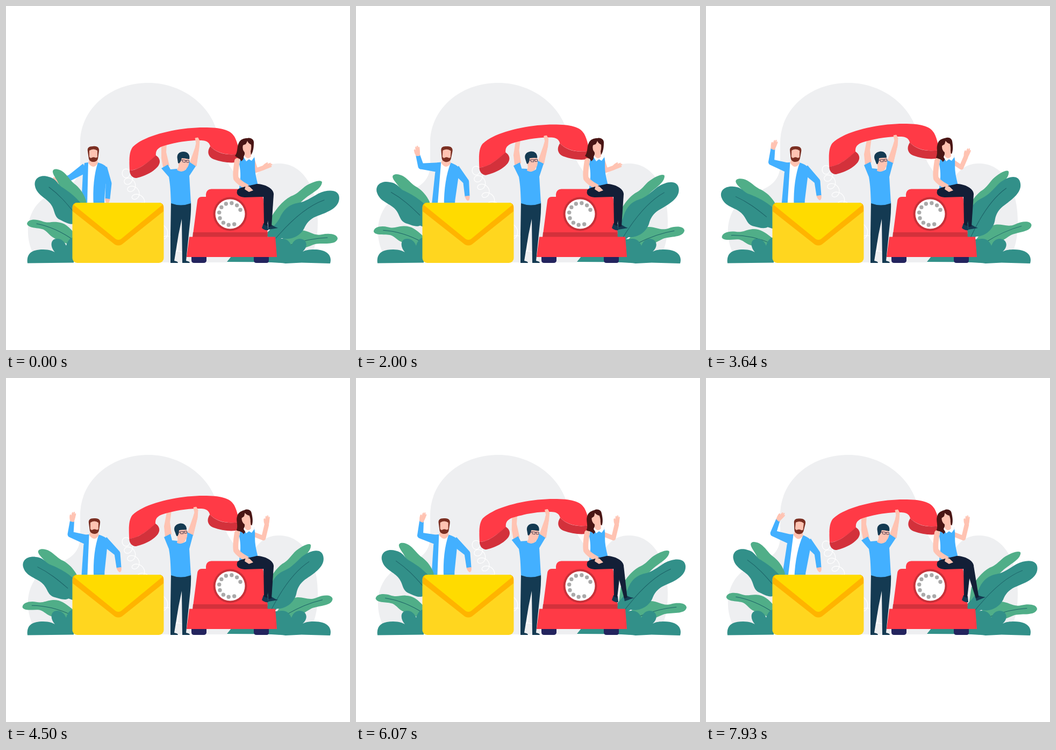
Animation, 640 px wide and 640 px high, one loop 8000 ms. Source, as an HTML page:

```html
<!DOCTYPE html>
<html lang="en">
<head>
<meta charset="utf-8">
<title>Contact us</title>
<style>
  html, body { margin: 0; width: 100%; height: 100%; overflow: hidden; background: #fff; }
  svg { display: block; width: 100vw; height: 100vh; }
  .blue { fill: #43b0ff; } .skin { fill: #ffc3b2; } .red { fill: #ff3a46; } .dark { fill: #d3313b; }
  .fir { fill: #329089; } .mint { fill: #50ae88; } .denim { fill: #143a52; } .navy { fill: #131f37; }
  .hair { fill: #4a1615; } .beard { fill: #7b2f22; } .white { fill: #fff; }
  .vein { fill: none; stroke: #1d6368; stroke-width: 1; stroke-linecap: round; }
  .limb { fill: none; stroke: #ffc3b2; stroke-width: 8.5; stroke-linecap: round; stroke-linejoin: round; }
  .hand { fill: #ffc3b2; stroke: #ffc3b2; stroke-width: 1; stroke-linejoin: round; }
</style>
</head>
<body>
<svg viewBox="0 0 640 640">
  <path fill="#eeeff1" d="M50 460C34 425 38 382 70 358C95 342 138 340 138 295V255C138 193 192 143 265 143C325 143 378 182 392 232C402 285 430 330 455 327C468 312 478 292 510 293C552 294 580 338 580 400C580 430 576 448 568 462L420 464Q415 470 411 477H124Z"/>
  <path id="cord" fill="none" stroke="#fff" stroke-width="1.2"/>

  <g id="waver">
    <path id="farArm" class="blue"/>
    <path id="farHand" class="hand" d="M-4 1C-3 5 -3 7 0 9C3 9 4 5 4 1Z"/>
    <path id="waveArm" class="blue"/>
    <path id="waveHand" class="hand"/>
    <g id="waveBody">
      <path class="white" d="M152 291H173L167 372H149Z"/>
      <path class="blue" d="M146 292L153 291L151 372H140L143 312Z"/>
      <path class="blue" d="M171 291C180 294 187 297 188 303L183 360V372H163C161 340 164 312 171 291Z"/>
      <path class="skin" d="M156 283H169L171 292Q163 306 153 292Z"/>
      <path class="beard" d="M152 270C151 264 154 261 162 261C170 260 174 264 173 270L171 284C169 292 156 292 154 284Z"/>
      <path class="skin" d="M155 269Q163 264 170 269L170 281Q168 283 166 282Q162 280 158 283Q155 282 155 280Z"/>
    </g>
  </g>

  <g id="lBack"><path class="mint" d="M87 309C86 301 99 302 108 310C117 318 120 326 130 333C139 341 145 350 149 362V410L130 400C112 378 108 350 99 334C95 322 88 316 87 309Z"/></g>
  <g id="lBig">
    <path class="fir" d="M54 335C51 319 66 313 80 318C95 322 95 331 104 337C115 344 130 354 146 375L152 420L126 405C118 408 108 401 99 397C88 390 92 379 82 367C74 357 57 351 54 335Z"/>
    <path class="vein" d="M80 337C99 351 112 366 128 386"/>
  </g>
  <g id="lLow">
    <path class="mint" d="M39 405C41 396 55 396 66 400C78 405 84 401 95 402C109 403 117 410 130 426L132 446C113 444 99 437 90 432C80 427 79 421 70 416C60 412 41 414 39 405Z"/>
    <path class="vein" d="M57 405C82 410 104 420 126 436"/>
  </g>
  <path class="fir" d="M40 478.500C38 462 46 453 69 453C81 453 87 456 91 458C81 447 83 433 95 433C104 433 109 439 112 446C114 438 118 432 126 430V477.500Z"/>

  <rect x="123.500" y="366" width="170" height="112" rx="9" fill="#ffd61f"/>
  <path fill="#ffb400" d="M124 373Q124 368 130 366H287Q293 368 293 373V382L219 441Q209 450 199 441L124 382Z"/>
  <path fill="#ffdb00" d="M126 370Q129 366 134 366H284Q289 366 291 370L217 431Q209 439 201 431Z"/>

  <g id="rBack"><path class="mint" d="M588 328C587 322 570 327 556 336C545 345 541 350 530 354C515 362 505 375 495 390L490 420C520 398 530 391 538 379C545 368 552 360 566 351C576 344 587 338 588 328Z"/></g>
  <g id="rLow">
    <path class="mint" d="M617 433C617 424 601 422 588 425C571 429 562 415 545 418C530 420 518 428 504 444L528 455C550 454 563 447 575 443C590 440 613 446 617 433Z"/>
    <path class="vein" d="M598 431C570 432 548 438 528 445"/>
  </g>
  <g id="rBig">
    <path class="fir" d="M620 357C620 342 601 340 581 349C567 357 557 364 545 366C525 369 516 380 509 395C501 408 492 416 482 425L500 440L513 432C532 437 550 426 556 411C561 401 569 394 581 390C600 383 620 375 620 357Z"/>
    <path class="vein" d="M592 361C558 373 526 404 502 432"/>
  </g>
  <path class="fir" d="M411 476C418 468 421 462 430 455H488L486 436C498 434 505 434 512 433C522 432 528 438 531 446C534 438 539 433 547 433C560 434 563 447 552 457C558 454 563 453 574 453C594 453 608 462 603 479L550 477.500L520 479Q500 476 411 476Z"/>

  <g>
    <path fill="#24245e" d="M345 465H373V474Q372 478 368 478H350Q345 478 345 473ZM461 465H489V473Q489 478 485 478H466Q461 478 461 473Z"/>
    <path class="red" d="M348 424L356 363Q357 355 364 355H372V350Q373 341 382 340.500H462Q476 343 479 360L487 424Z"/>
    <path class="dark" d="M348 421H486L487 431H347Z"/>
    <path class="red" d="M341 429.500H501L504 467H336Z"/>
    <circle cx="417" cy="387" r="31.5" fill="#c93038"/>
    <circle cx="417" cy="387" r="27.5" class="white"/>
    <g id="dial" fill="#a9a9a9"></g>
  </g>

  <g>
    <path class="denim" d="M307 364H344C345 385 342 405 340 425L335 474Q342 475 342 478H328L327 396L321 425L313 474Q320 475 320 478H306L306 425Z"/>
    <path id="armL" class="skin"/>
    <g id="handset">
      <path class="red" d="M230 306C229 285 229 271 236 262C258 240 320 226 368 226C400 226 417 230 425 243C430 252 433 264 434 275C415 279 392 274 380 261C377 249 366 250 357 250C335 250 310 255 291 261C281 265 278 270 279 279C265 290 248 305 230 306Z"/>
      <path class="dark" d="M230 306C248 305 265 290 279 278C287 283 288 291 283 298C275 308 260 316 243 320C237 321 230 315 230 306Z"/>
      <path class="dark" d="M380 261C392 274 412 279 434 275V290C420 293 402 291 386 285C375 280 374 270 380 261Z"/>
    </g>
    <path id="armR" class="hand"/>
    <path id="shirt" class="blue"/>
    <g id="holderHead">
      <path class="skin" d="M321 290L336 298L334 305Q326 311 318 305L321 299Z"/>
      <path class="skin" d="M324 283L340 282C342 290 340 297 337 301C333 305 325 304 322 296Z"/>
      <path class="denim" d="M319 285C317 276 322 271 330 271C338 271 343 277 341 285Q332 283 327 283L325 289L322 293L320 292Z"/>
      <path fill="none" stroke="#2b2440" stroke-width=".8" d="M324 286L328 287M328 286L334 287L333.500 291L328.500 290ZM334 287.500H336M336 287L341 287.500L340.500 291L336 291Z"/>
    </g>
  </g>

  <g>
    <path id="talkArm" class="limb"/>
    <path id="talkHand" class="hand"/>
    <path class="blue" d="M436 284L443 279C450 289 455 286 461 278C465 287 462 297 464 310C465 320 468 327 469 336L433 344C437 322 437 310 434 294Z"/>
    <path class="limb" style="stroke-width:10" d="M430 288C428 300 426 312 428 321Q434 329 447 336"/>
    <path class="hand" d="M444 332L452 335L459 340L455 341L459 345L453 346Q446 344 441 336Z"/>
    <path class="denim" d="M479 404L487 406L488 417Q481 418 476 413Z"/>
    <path class="navy" d="M479 348H493L486 409L480 407Z"/>
    <g id="shin">
      <path class="denim" d="M488 408L494 407Q500 411 506 413L488 416Z"/>
      <path class="navy" d="M483 348Q494 340 498 350L494 410L488 411Z"/>
    </g>
    <path class="navy" d="M430 344C430 338 447 336 466 331C481 331 498 339 498 350C494 357 486 355 476 355L444 356C433 355 428 351 430 344Z"/>
    <path class="skin" d="M446 334L453 336L460 343L452 346L444 341Z"/>
    <g id="talkHead">
      <path class="hair" d="M449 246C456 244 462 249 461 255C461 263 460 271 456 277L450 272L444 277L441 286L437 289C437 284 430 282 426 279C432 270 429 262 433 255C436 248 442 246 449 246Z"/>
    </g>
    <path class="white" d="M442 281L444 276L450 282L455 283L460 276L462 281L457 288L452 285L447 289Z"/>
    <path class="skin" d="M444 268H455L456 280Q450 287 444 279Z"/>
    <g id="talkFace">
      <path class="skin" d="M441 259L446 257Q448 254 449 251Q451 256 456 258C457 266 455 275 450 276Q445 276 443 271Q439 266 441 259Z"/>
    </g>
  </g>
</svg>
<script>
const LOOP = 8000;
const $ = id => document.getElementById(id);
const set = (id, d) => $(id).setAttribute('d', d);
const move = (id, tf) => $(id).setAttribute('transform', tf);
const lerp = (a, b, k) => a + (b - a) * k;
const ease = (t, a, b) => {
  const k = Math.min(1, Math.max(0, (t - a) / (b - a)));
  return (1 - Math.cos(Math.PI * k)) / 2;
};

// Blend two paths that share the same commands.
function mix(a, b, k) {
  const nums = b.match(/-?[\d.]+/g);
  let i = 0;
  return a.replace(/-?[\d.]+/g, n => lerp(+n, +nums[i++], k).toFixed(2));
}

// Eased value between keys at the given times.
const TIMES = [0, 1290, 2790, 4500, 5500, 6790, 7930];
function keyed(t, vals) {
  let i = 0;
  while (i < TIMES.length - 2 && t > TIMES[i + 1]) i++;
  return lerp(vals[i], vals[i + 1], ease(t, TIMES[i], TIMES[i + 1]));
}

// Tapered segment with a round far end.
function taper(a, b, wa, wb) {
  const dx = b[0] - a[0], dy = b[1] - a[1], len = Math.hypot(dx, dy) || 1;
  const nx = -dy / len / 2, ny = dx / len / 2;
  const p = (o, w) => `${(o[0] + nx * w).toFixed(2)} ${(o[1] + ny * w).toFixed(2)}`;
  return `M${p(a, wa)}L${p(b, wb)}A${wb / 2} ${wb / 2} 0 0 0 ${p(b, -wb)}L${p(a, -wa)}Z`;
}
const limb = (a, b, c, w) => taper(a, b, w[0], w[1]) + taper(b, c, w[1], w[2]) + taper(c, b, w[2], w[1]);

function spin([x, y], [cx, cy], deg) {
  const r = deg * Math.PI / 180, c = Math.cos(r), s = Math.sin(r);
  return [cx + (x - cx) * c - (y - cy) * s, cy + (x - cx) * s + (y - cy) * c];
}

function bezier(u, p) {
  const v = 1 - u;
  return v * v * v * p[0] + 3 * v * v * u * p[1] + 3 * v * u * u * p[2] + u * u * u * p[3];
}

function cord(lift) {
  let d = '';
  for (let i = 0; i <= 240; i++) {
    const u = i / 240, a = u * 18 * Math.PI - 1;
    const x = bezier(u, [224, 227, 262, 328]) + 9 * Math.cos(a);
    const y = bezier(u, [300, 350, 375, 468]) - lift * (1 - u) + (8 + 7 * (1 - u) ** 8) * Math.sin(a);
    d += (i ? 'L' : 'M') + x.toFixed(1) + ' ' + y.toFixed(1);
  }
  return d;
}

const PALM = 'M-3 1C-5 -3 -6 -6 -6 -10L-5 -11L-3 -8L-3 -15L-2 -16L-1 -10L0 -17L1 -17L2 -10L3 -15L4 -14C4 -8 4 -3 3 1Z';
set('waveHand', PALM);
set('talkHand', PALM);
for (let i = 0; i < 10; i++) {
  const [x, y] = spin([437.5, 387], [417, 387], 68 + 30 * i);
  $('dial').innerHTML += `<circle cx="${x}" cy="${y}" r="3.700"/>`;
}

function leaves(t) {
  const k = (1 - Math.cos(2 * Math.PI * (t - 40) / 7120)) / 2;
  move('lBig', `rotate(${-12.2 * k} 150 461)`);
  move('lBack', `rotate(${-13 * k} 156 456)`);
  move('lLow', `rotate(${-12.6 * k} 150 461)`);
  move('rBig', `rotate(${-16 * k} 497 469)`);
  move('rBack', `rotate(${-10.6 * k} 470 452)`);
  move('rLow', `rotate(${-12.8 * k} 497 471)`);
}

function waver(t) {
  const pivot = [163, 385];
  const lean = keyed(t, [0, 3.2, 3.2, 1, 4.6, -4.6, 5.9]);
  move('waveBody', `rotate(${lean} ${pivot})`);

  const elbow = [keyed(t, [120, 119, 123, 120, 124, 113, 125]), keyed(t, [319, 305, 290, 291, 290, 297, 289])];
  const wrist = [keyed(t, [102, 106, 126, 123, 131, 109, 134]), keyed(t, [325, 288, 265, 266, 264, 270, 264])];
  set('waveArm', limb(spin([148, 301], pivot, lean), elbow, wrist, [18, 11, 8]));
  move('waveHand', `translate(${wrist}) rotate(${keyed(t, [-82, -34, 28, 12, 36, 0, 42])})`);

  const k = ease(t, -100, 2700);
  const bend = [lerp(191, 207, k), lerp(330, 326, k)];
  const cuff = [lerp(189, 210, k), lerp(358, 352, k)];
  set('farArm', limb(spin([180, 302], pivot, lean), bend, cuff, [17, 11, 9]));
  move('farHand', `translate(${cuff}) rotate(${lerp(8, -8, k)})`);
}

function holder(t) {
  const k = ease(t, 750, 2560) - ease(t, 4650, 6500);
  move('handset', `translate(${-0.8 * k} ${-7 * k})`);
  set('cord', cord(7 * k));
  move('holderHead', `rotate(${-12.5 * k} 326 306)`);
  set('armL', mix('M289 260L299 256L298 272L304 297L293 305L289 283Z',
                  'M299 250L308 246L305 268L308 291L296 296L294 276Z', k));
  set('armR', mix('M352 246L357 245L360 251L359 264L354 298L342 292L352 264L354 255Z',
                  'M349 241L354 240L357 246L356 260L348 293L338 288L348 260L351 250Z', k));
  set('shirt', mix('M289 302L301 295L306 304L318 303Q326 311 335 304L341 290L353 298L341 316L344 367Q325 374 307 367C306 345 306 335 303 318Z',
                   'M294 296L306 290L309 302L318 303Q326 311 335 304L337 287L348 292L341 318L344 367Q325 374 307 367C306 345 306 335 303 318Z', k));
}

function talker(t) {
  const k = ease(t, 2550, 4250);
  const wrist = [lerp(479, 485, k), lerp(301, 273, k)];
  set('talkArm', mix('M459 288L465 306L479 301', 'M459 290L479 298L485 273', k));
  move('talkHand', `translate(${wrist}) rotate(${lerp(66, 5, k)})`);
  const nod = `rotate(${-14 * k} 446 270)`;
  move('talkHead', nod);
  move('talkFace', nod);
  move('shin', `rotate(${-17.5 * ease(t, 4900, 7000) + 4.5 * ease(t, 7100, 8000)} 490 350)`);
}

let start;
function frame(now) {
  if (start === undefined) start = now;
  const t = (now - start) % LOOP;
  leaves(t);
  waver(t);
  holder(t);
  talker(t);
  requestAnimationFrame(frame);
}
requestAnimationFrame(frame);
</script>
</body>
</html>
```
